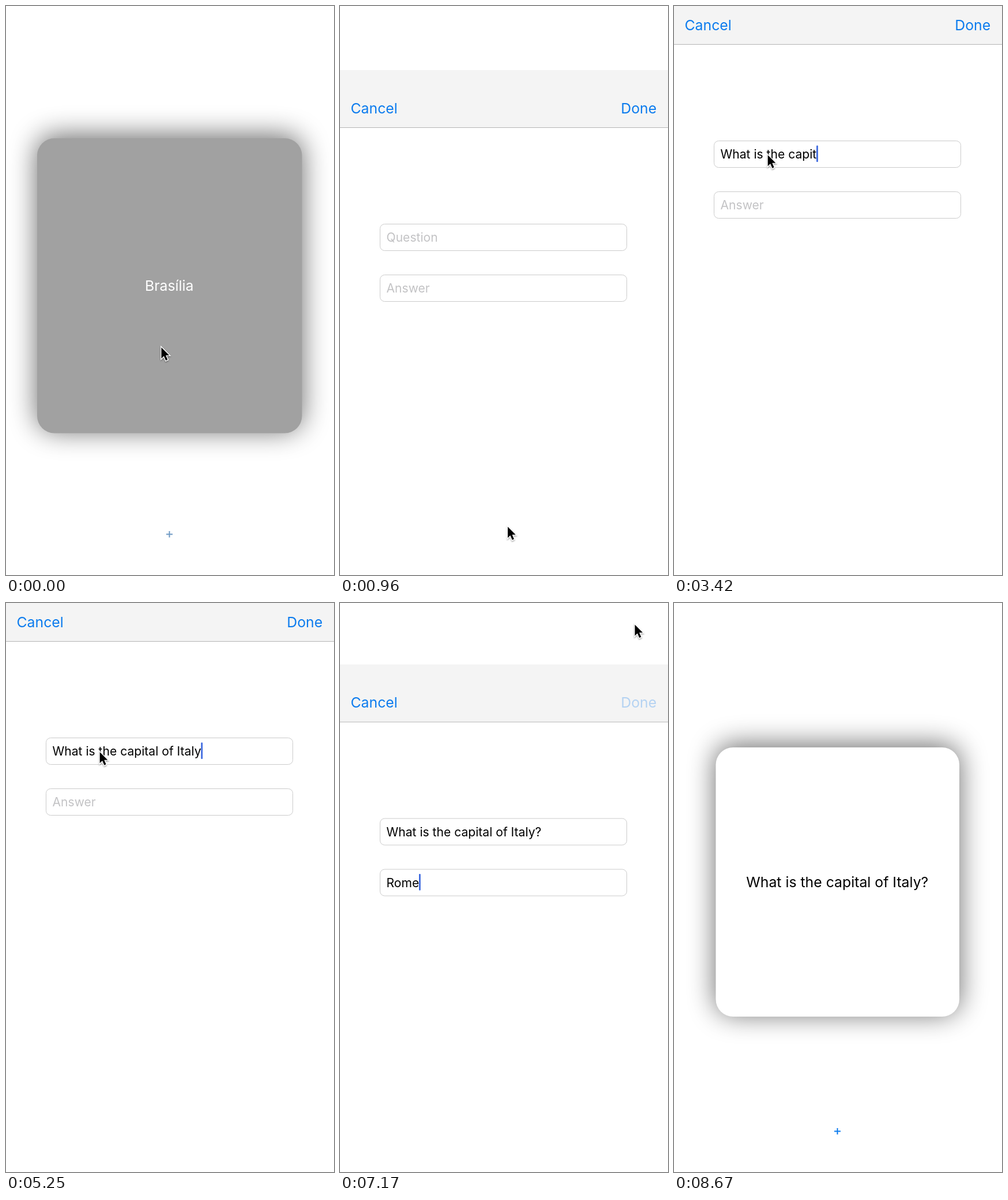
Animation of 569 by 985 pixels, one loop 8910 ms. Source, as an HTML page:

```html
<!DOCTYPE html>
<html lang="en">
<head>
<meta charset="utf-8">
<title>Flashcards</title>
<style>
  html, body { margin: 0; width: 100%; height: 100%; overflow: hidden; background: #fff; }
  svg { display: block; width: 100vw; height: 100vh; }
  text { font-family: Inter, "Liberation Sans", sans-serif; font-size: 24.8px; white-space: pre; }
  .field { fill: #fff; stroke: #cbcbcb; }
  .entry { font-size: 21.1px; }
  .blue { fill: #0b7bee; }
  .caret { fill: #3f6be0; }
</style>
</head>
<body>
<svg viewBox="0 0 569 985">
  <defs>
    <filter id="blur" filterUnits="userSpaceOnUse" x="-60" y="100" width="700" height="780">
      <feGaussianBlur stdDeviation="24"/>
    </filter>
    <filter id="soft" x="-50%" y="-50%" width="200%" height="200%">
      <feDropShadow dx="0" dy="1.5" stdDeviation="1.3" flood-opacity=".4"/>
    </filter>
  </defs>
  <rect width="569" height="985" fill="#fff"/>
  <rect id="shadow" rx="30" fill="#000" opacity=".59" filter="url(#blur)"/>
  <rect id="card" rx="30"/>
  <text id="label" x="283.3" text-anchor="middle"></text>
  <path id="plus" d="M278 914.5h11M283.5 909v11" stroke-width="2"/>

  <g id="sheet">
    <rect y="-33" width="569" height="1100" fill="#fff"/>
    <rect y="-33" width="569" height="99" fill="#f4f4f4"/>
    <rect y="66" width="569" height="1" fill="#b4b4b4"/>
    <text class="blue" x="18.5" y="41.5">Cancel</text>
    <text class="blue" id="done" x="549.2" y="41.5" text-anchor="end">Done</text>
    <rect class="field" x="69.5" y="233.5" width="428" height="46" rx="8"/>
    <rect class="field" x="69.5" y="321.5" width="428" height="46" rx="8"/>
    <text class="entry" id="question" x="80.5" y="264"></text>
    <text class="entry" id="answer" x="80.5" y="352"></text>
    <rect class="caret" id="caret" width="2.8" height="28.5" rx="1"/>
  </g>

  <path id="cursor" d="M0 0v19.2l4.4-4.2 3.4 7.7 3.1-1.4-3.3-7.5h6.1z" fill="#000" stroke="#fff"
        stroke-width="2.6" paint-order="stroke" filter="url(#soft)"/>
</svg>
<script>
const LOOP = 8910, STEP = 30;
const SHEET_TRAVEL = 1018, SPRING = 0.031;
const PRESENT = 848.8, DISMISS = 7149.2;
const QUESTION = "What is the capital of Italy?", ANSWER = "Rome";

const $ = id => document.getElementById(id);
const set = (el, attrs) => { for (const k in attrs) el.setAttribute(k, attrs[k]); };
const clamp01 = v => Math.min(1, Math.max(0, v));
const smooth = p => p * p * (3 - 2 * p);
const easeOut = p => 1 - (1 - p) ** 2.4;

// Bursts of typing: start, end, characters before, characters after
const questionBursts = [[2070, 2730, 0, 10], [2880, 3060, 10, 15], [3300, 4050, 15, 23],
                        [4230, 5040, 23, 28], [5310, 5310, 28, 29]];
const answerBursts = [[6120, 6480, 0, 4]];

// Pointer moves: start, end, target x, target y, easing
const pointerHome = [269.5, 591];
const pointerMoves = [
  [270, 720, 291, 901.5, smooth],
  [960, 1500, 162.7, 258, easeOut],
  [5550, 5820, 162.7, 346, smooth],
  [6630, 6990, 511.5, 37.5, smooth],
  [7200, 7530, 364, 315, smooth],
  [7530, 7650, 359.7, 331, easeOut],
  [8370, 8640, 340, 934, smooth]
];

function typedCount(bursts, t) {
  let count = 0;
  for (const [start, end, from, to] of bursts) {
    if (t < start) break;
    const p = end > start ? clamp01((t - start) / (end - start)) : 1;
    count = from + 1 + Math.floor(p * (to - from - 1) + 1e-6);
  }
  return count;
}

function pointerAt(t) {
  let [x, y] = pointerHome;
  for (const [start, end, tx, ty, ease] of pointerMoves) {
    const p = ease(clamp01((t - start) / (end - start)));
    x += (tx - x) * p;
    y += (ty - y) * p;
  }
  return [x, y];
}

// Critically damped spring: 1 at rest, falling to 0
function springLeft(ms) {
  const u = Math.max(0, ms) * SPRING;
  return (1 + u) * Math.exp(-u);
}

function sheetOffset(t) {
  const share = t < DISMISS ? springLeft(t - PRESENT) : 1 - springLeft(t - DISMISS);
  return Math.round(share * SHEET_TRAVEL * 2) / 2;
}

function drawCard(t) {
  const back = t < 7100 || (t >= 7890 && t < 8370);
  const box = back ? { x: 54, y: 229, width: 459.5, height: 510.5 }
                   : { x: 72.5, y: 250, width: 422.5, height: 466 };
  set($("card"), { ...box, fill: back ? "#a1a1a1" : "#fff" });
  set($("shadow"), { ...box, y: box.y - 4.6 });
  set($("label"), { y: back ? 493 : 491.5, fill: back ? "#fff" : "#000" });
  $("label").textContent = !back ? QUESTION : t < 7100 ? "Brasília" : ANSWER;
  set($("plus"), { stroke: t < 7100 ? "#6f9ac4" : "#0b7bee" });
}

function drawEntry(el, value, count, placeholder) {
  el.textContent = count ? value.slice(0, count) : placeholder;
  set(el, { fill: count ? "#000" : "#c3c3c5" });
  return count ? el.getComputedTextLength() : 0;
}

function drawSheet(t) {
  const offset = sheetOffset(t);
  set($("sheet"), { transform: `translate(0 ${offset})`,
                    visibility: offset < SHEET_TRAVEL ? "visible" : "hidden" });
  set($("done"), { opacity: t >= 7050 ? 0.27 : 1 });
  const questionWidth = drawEntry($("question"), QUESTION, typedCount(questionBursts, t), "Question");
  const answerWidth = drawEntry($("answer"), ANSWER, typedCount(answerBursts, t), "Answer");
  const inAnswer = t >= 5910;
  set($("caret"), { x: 80.3 + (inAnswer ? answerWidth : questionWidth),
                    y: inAnswer ? 329.5 : 241.5,
                    opacity: t >= 1560 ? 1 : 0 });
}

function draw(t) {
  drawCard(t);
  drawSheet(t);
  const [x, y] = pointerAt(t);
  set($("cursor"), { transform: `translate(${x} ${y})`, visibility: t < 8670 ? "visible" : "hidden" });
}

const began = performance.now();
function tick() {
  const t = (performance.now() - began) % LOOP;
  draw(Math.floor(t / STEP) * STEP);
  requestAnimationFrame(tick);
}
tick();
</script>
</body>
</html>
```
